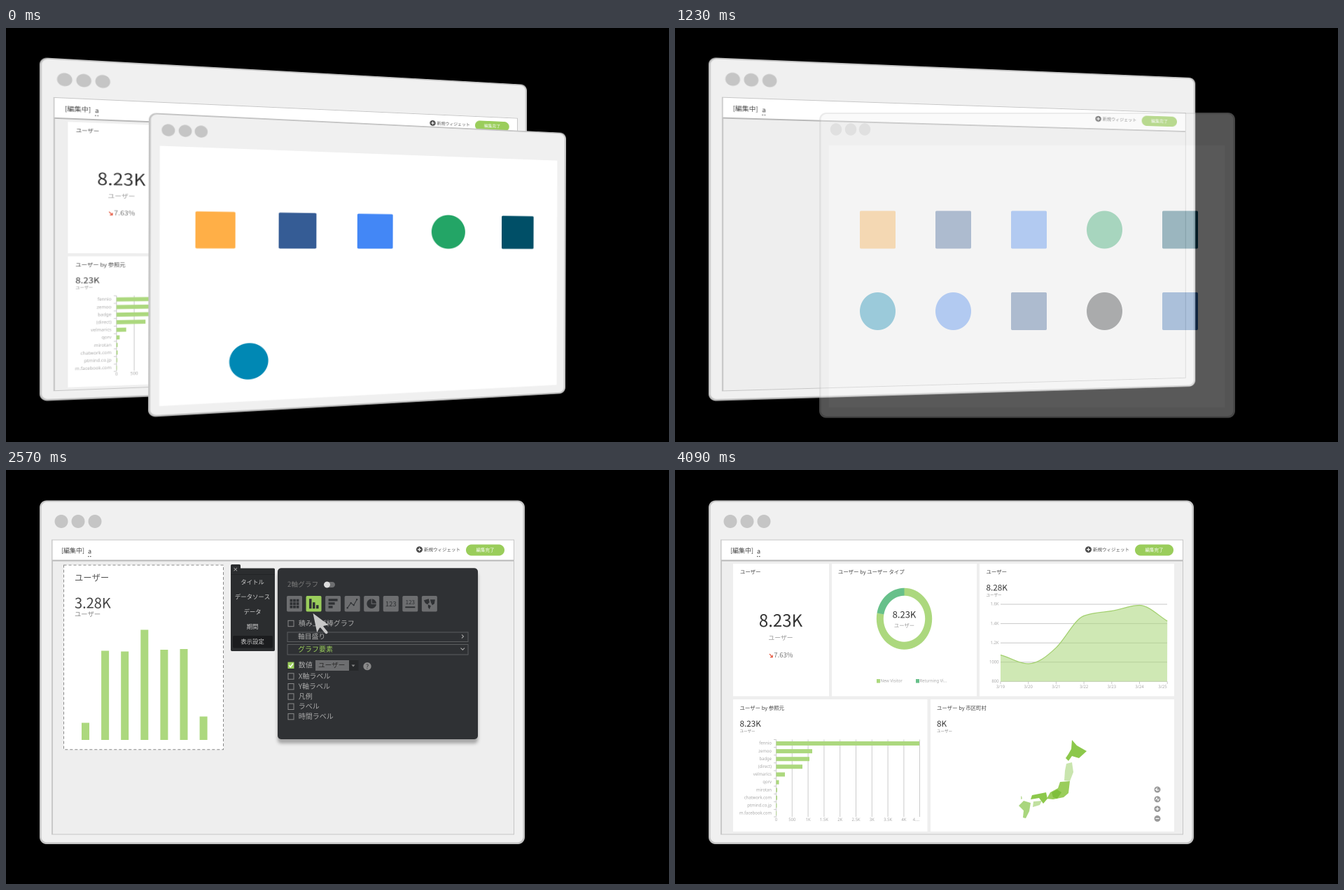
These frames come from a looping animation (947 px wide and 592 px high, 4.69 s). An HTML page with a canvas:

```html
<!DOCTYPE html>
<html lang="ja">
<head>
<meta charset="utf-8">
<title>Dashboard</title>
<style>
html, body { margin: 0; width: 100%; height: 100%; overflow: hidden; background: #000; }
canvas { position: absolute; left: 0; top: 0; width: 947px; height: 592px; transform-origin: 0 0; }
</style>
</head>
<body>
<canvas id="back"></canvas>
<canvas id="front"></canvas>
<script>
const W = 947, H = 592, LOOP = 4690, DPR = 2;
const CJK = '"Noto Sans CJK JP", "Noto Sans CJK", sans-serif';
const LATIN = '"Noto Sans", sans-serif';
const GREEN = '#9acd5b', BAR = '#acd87e', DARK = '#2f3134', GREY = '#6d6e70';

const STEPS = [0, 170, 300, 430, 600, 800, 970, 1100, 1200, 1300, 1400, 1490,
  1520, 1570, 1620, 1650, 1810, 1980, 2040, 2110, 2170, 2340,
  2540, 2610, 2680, 2750, 2820, 2890, 3090, 3290, 3420, 3550, 3720, 3920, 4090];

const back = document.getElementById('back');
const front = document.getElementById('front');
const layer = document.createElement('canvas');
for (const el of [back, front, layer]) { el.width = W * DPR; el.height = H * DPR; }
let c;

function begin(el, dy = 0) {
  c = el.getContext('2d');
  c.setTransform(1, 0, 0, 1, 0, 0);
  c.clearRect(0, 0, el.width, el.height);
  c.setTransform(DPR, 0, 0, DPR, 0, dy * DPR);
}

// Draw a group with one common opacity.
function group(alpha, draw) {
  if (alpha <= 0) return;
  if (alpha >= 1) return draw();
  const outer = c, dy = c.getTransform().f / DPR;
  begin(layer, dy);
  draw();
  c = outer;
  c.save();
  c.setTransform(1, 0, 0, 1, 0, 0);
  c.globalAlpha = alpha;
  c.drawImage(layer, 0, 0);
  c.restore();
}

// Piecewise linear value over [time, value] keys.
function track(t, keys) {
  if (t <= keys[0][0]) return keys[0][1];
  for (let i = 1; i < keys.length; i++) {
    const [a, p] = keys[i - 1], [b, q] = keys[i];
    if (t <= b) return p + (q - p) * (t - a) / (b - a);
  }
  return keys[keys.length - 1][1];
}

// Map a rectangle of an element onto a quad (clockwise from top left).
function warp(el, [x, y, w, h], [x0, y0, x1, y1, x2, y2, x3, y3]) {
  const ax = x1 - x2, ay = y1 - y2, bx = x3 - x2, by = y3 - y2;
  const sx = x0 - x1 + x2 - x3, sy = y0 - y1 + y2 - y3, den = ax * by - bx * ay;
  const g = (sx * by - bx * sy) / den, k = (ax * sy - sx * ay) / den;
  const m = [x1 - x0 + g * x1, y1 - y0 + g * y1, 0, g,
    x3 - x0 + k * x3, y3 - y0 + k * y3, 0, k, 0, 0, 1, 0, x0, y0, 0, 1];
  el.style.transform = `matrix3d(${m}) scale(${1 / w},${1 / h}) translate(${-x}px,${-y}px)`;
}

function rect(x, y, x2, y2, fill, r = 0) {
  c.fillStyle = fill;
  c.beginPath();
  c.roundRect(x, y, x2 - x, y2 - y, r);
  c.fill();
}
function frame(x, y, x2, y2, color, w = 1) {
  c.strokeStyle = color;
  c.lineWidth = w;
  c.strokeRect(x, y, x2 - x, y2 - y);
}
function disc(x, y, rx, fill, ry = rx) {
  c.fillStyle = fill;
  c.beginPath();
  c.ellipse(x, y, rx, ry, 0, 0, 7);
  c.fill();
}
function line(pts, color, w = 1) {
  c.strokeStyle = color;
  c.lineWidth = w;
  c.beginPath();
  for (let i = 0; i < pts.length; i += 2) c.lineTo(pts[i], pts[i + 1]);
  c.stroke();
}
function poly(pts, fill) {
  c.fillStyle = fill;
  c.beginPath();
  for (let i = 0; i < pts.length; i += 2) c.lineTo(pts[i], pts[i + 1]);
  c.fill();
}
function text(s, x, y, size, color, align = 'left', font = CJK) {
  c.font = `${size}px ${font}`;
  c.fillStyle = color;
  c.textAlign = align;
  c.textBaseline = 'middle';
  c.fillText(s, x, y);
}
const tiny = (s, x, y, align = 'center') => text(s, x, y, 5.9, '#aaa', align, LATIN);
function plus(x, y, r, color, w = 1) {
  line([x - r, y, x + r, y], color, w);
  line([x, y - r, x, y + r], color, w);
}

/* ---- windows ---- */

function shell(x, y, x2, y2) {
  rect(x, y, x2, y2, '#c5c5c5', 10);
  rect(x + 2.5, y + 2, x2 - 2.5, y2 - 2.5, '#f0f0f0', 8);
}

function backWindow() {
  shell(48, 43.5, 741, 535);
  for (const x of [79, 103, 127]) disc(x, 73.5, 9.5, '#c5c5c5');
  rect(65, 99.5, 726, 521.5, '#eee');
  frame(65.5, 100, 725.5, 521, '#c6c6c6');
  rect(65, 100, 67, 521, '#c9c9c9');
}

function toolbar() {
  rect(66.5, 100.5, 725, 129, '#fff');
  rect(66.5, 128.5, 725, 130.5, '#b8b8b8');
  text('[編集中]', 79, 115, 9, '#444');
  text('a', 119.5, 116, 9, '#333', 'center');
  rect(117, 123, 118.5, 124.2, '#555');
  rect(120, 123, 121.5, 124.2, '#555');
  disc(590.5, 113.7, 4.5, '#484848');
  plus(590.5, 113.7, 2.5, '#fff', 1.2);
  text('新規ウィジェット', 597, 113.7, 6.5, '#555');
  rect(657, 106.5, 712, 122.5, GREEN, 8);
  text('編集完了', 684.5, 114.2, 6.5, '#fff', 'center');
}

/* ---- dashboard ---- */

function heading(title, value, x, y) {
  text(title, x, y, 7.4, '#444');
  if (!value) return;
  text(value, x, y + 22.5, 11.7, '#333');
  text('ユーザー', x, y + 33.5, 5.5, '#888');
}

function donut() {
  const ring = (from, to, color) => {
    c.fillStyle = color;
    c.beginPath();
    c.ellipse(327.5, 212.7, 39.7, 44, 0, from, to);
    c.ellipse(327.5, 212.7, 29.7, 33, 0, to, from, true);
    c.fill();
  };
  ring(-Math.PI / 2, Math.PI * 1.06, BAR);
  ring(Math.PI * 1.06, Math.PI * 1.5, '#67c08a');
  text('8.23K', 327.5, 206.5, 13, '#333', 'center');
  text('ユーザー', 327.5, 222, 7.3, '#999', 'center');
  rect(288, 299, 293, 304.5, BAR);
  tiny('New Visitor', 293.5, 302, 'left');
  rect(344, 299, 349, 304.5, '#67c08a');
  tiny('Returning Vi...', 349.5, 302, 'left');
}

function areaChart() {
  ['1.6K', '1.4K', '1.2K', '1000', '800'].forEach((s, i) => {
    const y = 192 + i * 27.6;
    line([465, y, 703, y], '#c8c8c8');
    tiny(s, 462.5, y, 'right');
  });
  const ys = [264.5, 277, 254, 208.5, 201.5, 193.5, 216], dx = 39.7;
  const slope = [10, 0, -38, -14, -6, 0, 24];
  const curve = () => {
    c.beginPath();
    c.moveTo(465, ys[0]);
    for (let i = 1; i < 7; i++) {
      const x = 465 + dx * i;
      c.bezierCurveTo(x - dx * 2 / 3, ys[i - 1] + slope[i - 1] / 3,
        x - dx / 3, ys[i] - slope[i] / 3, x, ys[i]);
    }
  };
  curve();
  c.lineTo(703, 302.5);
  c.lineTo(465, 302.5);
  c.fillStyle = 'rgba(172,216,126,.58)';
  c.fill();
  curve();
  c.strokeStyle = '#a2d06d';
  c.lineWidth = 1.2;
  c.stroke();
  for (let i = 0; i < 7; i++) {
    const x = 465 + dx * i;
    line([x, 302.5, x, 306], '#c8c8c8');
    tiny('3/' + (19 + i), i < 6 ? x : 696.5, 310.5);
  }
}

function sources() {
  const rows = [['fennio', 349], ['zemoo', 196], ['badge', 192], ['(direct)', 182],
    ['velmarics', 157], ['qorv', 148.5], ['mirotan', 146], ['chatwork.com', 146],
    ['ptmind.co.jp', 145.5], ['m.facebook.com', 145.2]];
  const marks = ['0', '500', '1K', '1.5K', '2K', '2.5K', '3K', '3.5K', '4K', '4....'];
  marks.forEach((s, i) => {
    const x = 144.5 + Math.min(i * 22.8, 205);
    line([x, 385.5, x, 496], '#ccc');
    tiny(s, i < 9 ? x : 344.5, 500.5);
  });
  rows.forEach(([name, end], i) => {
    const y = 391 + i * 11.1;
    line([141, y - 5.5, 144.5, y - 5.5], '#ccc');
    tiny(name, 138, y, 'right');
    rect(144.5, y - 3, end, y + 3, BAR);
  });
  line([141, 496, 144.5, 496], '#ccc');
}

function map() {
  poly([567, 386, 574, 394, 588, 402, 577, 412, 567, 409, 562, 416, 558, 412, 562, 406, 566, 399], '#8cc84b');
  poly([559, 420, 567, 418, 569, 432, 564, 445, 556, 444, 557, 430], '#c9e5ae');
  poly([550, 446, 564, 445, 562, 462, 555, 468, 540, 471, 531, 470, 536, 461, 547, 455], GREEN);
  poly([538, 461, 546, 457, 552, 461, 546, 470, 540, 468], '#7fbf3c');
  poly([510, 465, 530, 461, 532, 470, 526, 477, 520, 469, 508, 471], '#8cc84b');
  poly([512, 474, 524, 473, 521, 479, 511, 482], '#c0e09f');
  poly([491, 480, 498, 473, 508, 476, 506, 488, 501, 498, 497, 497, 498, 487], '#a9d67d');
  poly([494, 467, 495, 466, 496, 470, 494, 471], '#c0e09f');
  for (let i = 0; i < 4; i++) {
    const y = 457 + i * 13.8;
    disc(689, y, 4.5, '#999');
    if (i > 1) line([686.5, y, 691.5, y], '#fff', 1.2);
    if (i === 2) line([689, y - 2.5, 689, y + 2.5], '#fff', 1.2);
    if (i === 0) line([689, y - 2.5, 686.8, y, 689, y + 2, 686.8, y, 691.5, y + 1], '#fff');
    if (i === 1) line([686.5, y + 1, 688, y - 2, 690, y + 2, 691.5, y - 1], '#fff');
  }
}

function dashboard() {
  rect(83, 134, 220, 323.5, '#fff');
  rect(224, 134, 431, 323.5, '#fff');
  rect(435, 134, 713, 323.5, '#fff');
  rect(83, 328, 360.5, 517, '#fff');
  rect(365, 328, 713, 517, '#fff');
  heading('ユーザー', '', 93, 145.5);
  text('8.23K', 151, 215, 24, '#333', 'center');
  text('ユーザー', 151, 239.5, 8.8, '#999', 'center');
  line([135, 263, 139, 267.5], '#e2492f', 1.1);
  line([139.2, 264.5, 139.2, 267.7, 136, 267.7], '#e2492f', 1.1);
  text('7.63%', 141.3, 264.5, 9.5, '#777');
  heading('ユーザー by ユーザー タイプ', '', 233, 145.5);
  donut();
  heading('ユーザー', '8.28K', 444.5, 145.5);
  areaChart();
  heading('ユーザー by 参照元', '8.23K', 92.5, 340);
  sources();
  heading('ユーザー by 市区町村', '8K', 374, 340);
  map();
}

/* ---- widget editor ---- */

function card() {
  rect(82.5, 136, 310.5, 399.8, '#fff');
  c.setLineDash([4, 3]);
  frame(82.5, 136, 310.5, 399.8, '#8a8a8a');
  c.setLineDash([]);
  text('ユーザー', 98, 154, 12.3, '#555');
}

function pencil(pressed) {
  disc(196.5, 258.5, 31.7, pressed ? '#a5a5a5' : '#bcbcbc', 32.7);
  c.save();
  c.translate(196.5, 257);
  c.rotate(-Math.PI / 4);
  poly([-19, 0, -12, -5, -12, 5], '#fff');
  rect(-12, -5, 11, 5, '#fff');
  rect(12.5, -5, 18.5, 5, '#fff', [0, 4, 4, 0]);
  rect(-9, -1, 9, 1, '#bcbcbc');
  c.restore();
}

function columns() {
  [360, 257, 258, 227, 255.5, 254.5, 351].forEach((y, i) => {
    const x = 108 + i * 28.1;
    rect(x, y + 1.5, x + 11, 386, BAR);
  });
}

function bars(labels) {
  if (labels) for (let i = 0; i < 5; i++) {
    const x = 98 + i * 45.8;
    line([x, 228, x, 371], '#ccc', 1.3);
    text(300 + i * 100, i ? x : 107, 377, 10, '#aaa', 'center', LATIN);
  }
  [129, 259, 258, 296, 261, 262.5, 141].forEach((x, i) => {
    const y = 238 + i * 20.2;
    rect(98, y - 5.2, x, y + 5.2, BAR);
  });
  if (labels) line([98, 228, 98, 371], '#bbb');
}

function menu() {
  rect(321, 135, 335, 150, '#2b2d2f', 2);
  rect(321, 140.5, 384, 259, '#2b2d2f', 2);
  line([321, 149.5, 384, 149.5], '#232527');
  line([325.5, 139.8, 330, 144.3], '#aaa', .8);
  line([330, 139.8, 325.5, 144.3], '#aaa', .8);
  rect(324, 237, 381, 254.5, '#1b1c1e', 2);
  ['タイトル', 'データソース', 'データ', '期間', '表示設定'].forEach((s, i) =>
    text(s, 352, 160.3 + i * 21.2, 8.4, '#ccc', 'center'));
}

function panel(x2, y2) {
  c.save();
  c.shadowColor = 'rgba(0,0,0,.3)';
  c.shadowBlur = 10;
  c.shadowOffsetY = 12;
  rect(388, 140.3, x2, y2, DARK, 5);
  c.restore();
}
function help(x, y) {
  disc(x, y, 5.6, '#8a8a8a');
  text('?', x, y + .3, 9, DARK, 'center');
}

function dataPanel() {
  panel(671, 249.5);
  [['指標', 164], ['ディメンション', 215.7]].forEach(([s, y]) => {
    rect(402, y - 7.2, 516, y + 7.2, GREY, 2);
    c.strokeStyle = '#222';
    c.lineWidth = 1;
    c.beginPath();
    c.arc(415, y, 5, 0, 7);
    c.stroke();
    plus(415, y, 2.8, '#222');
    text(s, 431.5, y, 9.7, '#2b2b2b');
    help(528, y + .5);
  });
  rect(402, 181, 657, 197.5, '#434446');
  rect(402, 181, 405, 197.5, GREY);
  text('ユーザー', 411, 188.5, 9.7, '#aaa');
  poly([623.5, 186, 632, 186, 629, 190, 629, 194.5, 626.6, 192.5, 626.6, 190], '#bbb');
  for (const x of [641.5, 644.5, 647.5]) disc(x, 189.3, .9, '#bbb');
}

function chartIcon(i, x, on) {
  rect(x - 11, 180, x + 11, 202.5, on ? GREEN : GREY, 2);
  const ink = DARK, y = 191.2;
  if (i === 0) for (let k = 0; k < 9; k++) {
    const a = x - 6.5 + k % 3 * 4.6, b = y - 6.5 + Math.floor(k / 3) * 4.6;
    rect(a, b, a + 3.8, b + 3.8, ink);
  }
  if (i === 1) [-7, -2, 2].forEach((h, k) => rect(x - 6.5 + k * 5, y + h, x - 3 + k * 5, y + 7, ink));
  if (i === 2) [6.5, 2.5, -.5].forEach((w, k) => rect(x - 6.5, y - 7 + k * 5, x + w, y - 3.6 + k * 5, ink));
  if (i === 3) {
    const p = [x - 7, y + 6, x - 2, y - 1, x + 2, y + 2, x + 6.5, y - 6];
    line(p, ink);
    for (let k = 0; k < 8; k += 2) disc(p[k], p[k + 1], 1.2, ink);
  }
  if (i === 4) {
    disc(x, y, 6.8, ink);
    line([x, y - 6.8, x, y, x + 6.8, y], GREY);
  }
  if (i === 5 || i === 6) text('123', x, y - (i === 6 ? 2 : 0), i === 6 ? 8 : 9.5, ink, 'center');
  if (i === 6) rect(x - 7, y + 4, x + 7, y + 6, ink);
  if (i === 7) {
    poly([x - 8, y - 5, x - 1, y - 7, x, y - 2, x - 3, y + 1, x - 6, y - 1], ink);
    poly([x - 2, y + 1, x + 2, y + 3, x, y + 8, x - 2, y + 5], ink);
    poly([x + 1, y - 6, x + 8, y - 6, x + 7, y, x + 4, y + 2, x + 2, y - 2], ink);
  }
}

function option(label, y, on) {
  if (on) {
    rect(402.5, y - 4.7, 411.5, y + 4.7, GREEN);
    line([404.3, y, 406.3, y + 2.4, 410, y - 2.6], '#fff', 1.5);
  } else frame(403, y - 4.2, 411, y + 4.2, '#8a8a8a');
  text(label, 417.7, y - .5, 10, '#aaa');
}

function viewPanel(chart, labels) {
  panel(674, 385);
  text('2軸グラフ', 402, 163.5, 9.7, '#777');
  rect(455, 160, 470, 168, GREY, 4);
  disc(458.5, 164, 4.5, '#ddd');
  for (let i = 0; i < 8; i++) chartIcon(i, 412 + i * 27.55, i === chart);
  option('積み上げ棒グラフ', 219.5, false);
  frame(402, 232, 660, 245.5, '#5c5e60');
  frame(402, 249.5, 660, 264, '#5c5e60');
  text('軸目盛り', 417, 238, 9.8, '#aaa');
  text('グラフ要素', 417, 256, 10, GREEN);
  line([651, 235.5, 653.5, 238, 651, 240.5], '#aaa', 1.1);
  line([649.5, 254.5, 652.3, 257.2, 655, 254.5], '#aaa', 1.1);
  option('数値', 279.3, true);
  rect(442, 272, 490, 287, GREY);
  rect(490, 272, 503.5, 287, '#26282a');
  text('ユーザー', 446, 279, 9.6, '#2b2b2b');
  poly([493.5, 278.5, 498.5, 278.5, 496, 281.5], '#888');
  help(516, 280.7);
  option('X軸ラベル', 295, labels);
  ['Y軸ラベル', '凡例', 'ラベル', '時間ラベル'].forEach((s, i) => option(s, 309.7 + i * 14.3, false));
}

function cursor(x, y, size, color) {
  c.save();
  c.translate(x, y);
  c.scale(size, size);
  poly([0, 0, 29, 22, 18, 24, 12, 28, 7.5, 36], color);
  c.lineCap = 'round';
  line([15, 24, 25, 36], color, 5.5);
  c.restore();
}

function editor(t) {
  const labels = t >= 3090, flat = t >= 2680;
  card();
  if (t < 1810) pencil(t >= 1650);
  if (t >= 1980) {
    text('3.28K', 98, 190, 20, '#444');
    text('ユーザー', 98, 206, 9.3, '#888');
    if (flat) bars(labels); else columns();
    group(t < 2040 ? .5 : 1, () => {
      if (t < 2340) dataPanel(); else viewPanel(flat ? 2 : 1, labels);
      menu();
    });
  }
  if (t >= 1520 && t < 1810) {
    cursor(track(t, [[1520, 268], [1620, 203]]), track(t, [[1520, 345], [1620, 268.5]]), 1, '#3a3d40');
  } else if (t >= 2040 && t < 3090) {
    const x = track(t, [[2040, 390], [2170, 360], [2340, 360], [2610, 466], [2680, 466], [2890, 406]]);
    const y = track(t, [[2040, 285], [2170, 241.5], [2340, 241.5], [2610, 192], [2680, 192], [2890, 295]]);
    cursor(x, y, .76, '#c8c8c8');
  }
}

/* ---- source picker ---- */

const TILES = ['#ffaf47', '#355c95', '#4387f6', '#23a566', '#004f67',
  '#0088b4', '#4387f6', '#365d95', '#2c3033', '#2f6bb5'];
const ROUND = [3, 5, 6, 8];

function tile(i, x, y) {
  if (ROUND.includes(i)) disc(x, y, 25.5, TILES[i], 27);
  else rect(x - 25.5, y - 27, x + 25.5, y + 27, TILES[i], 2);
}

function picker(step) {
  shell(206, 121, 800, 557.5);
  for (const x of [230, 251, 271]) disc(x, 145, 8.2, '#c5c5c5', 8.7);
  rect(219.5, 168, 785.5, 542.5, '#fff');
  const glide = [0, .3, .55, .74, .92, 1];
  for (let i = 0; i < 5; i++) {
    const x = 289.5 + 108 * i, late = step - i;
    tile(i, x, 288.5);
    if (late < 0) continue;
    const left = step > 5 ? 0 : 1 - glide[late];
    tile(i + 5, x + (43.5 + 14 * i) * left, 405 + 78 * left);
  }
}

/* ---- timeline ---- */

const BACK = [48, 42, 693, 491], FRONT = [206, 121, 594, 436];
const corners = ([x, y, w, h]) => [x, y, x + w, y, x + w, y + h, x, y + h];
const BACK_TILT = [48, 42, 744, 81, 744, 505, 48, 533];
const FRONT_TILT = [204, 121, 800, 150, 799, 522, 203, 556];

function render(step) {
  const t = STEPS[step];
  begin(back, t < 2340 ? -1.5 : 0);
  backWindow();
  if (t < 1200) {
    dashboard();
    const veil = t < 970 ? 0 : t < 1100 ? .73 : .9;
    if (veil) rect(67, 130, 725, 520.5, `rgba(255,255,255,${veil})`);
  } else if (t >= 1490 && t < 3550) {
    group(track(t, [[3090, 1], [3290, .62], [3420, .25]]), () => editor(t));
  } else if (t >= 3720) {
    group(track(t, [[3720, .33], [3920, .67], [4090, 1]]), dashboard);
  }
  toolbar();
  const turn = track(t, [[1100, 0], [1200, .25], [1300, .6], [1400, .88], [1490, 1]]);
  const flat = corners(BACK);
  warp(back, BACK, BACK_TILT.map((v, i) => v + (flat[i] - v) * turn));

  const shown = track(t, [[970, 1], [1100, .75], [1200, .35], [1300, 0]]);
  front.style.opacity = shown;
  if (shown > 0) {
    begin(front);
    picker(step);
    warp(front, FRONT, t < 970 ? FRONT_TILT : corners(FRONT));
  }
}

let last = -1;
const start = performance.now();
function tick() {
  const t = (performance.now() - start) % LOOP;
  let step = STEPS.length - 1;
  while (STEPS[step] > t) step--;
  if (step !== last) render(last = step);
  requestAnimationFrame(tick);
}
tick();
</script>
</body>
</html>
```
